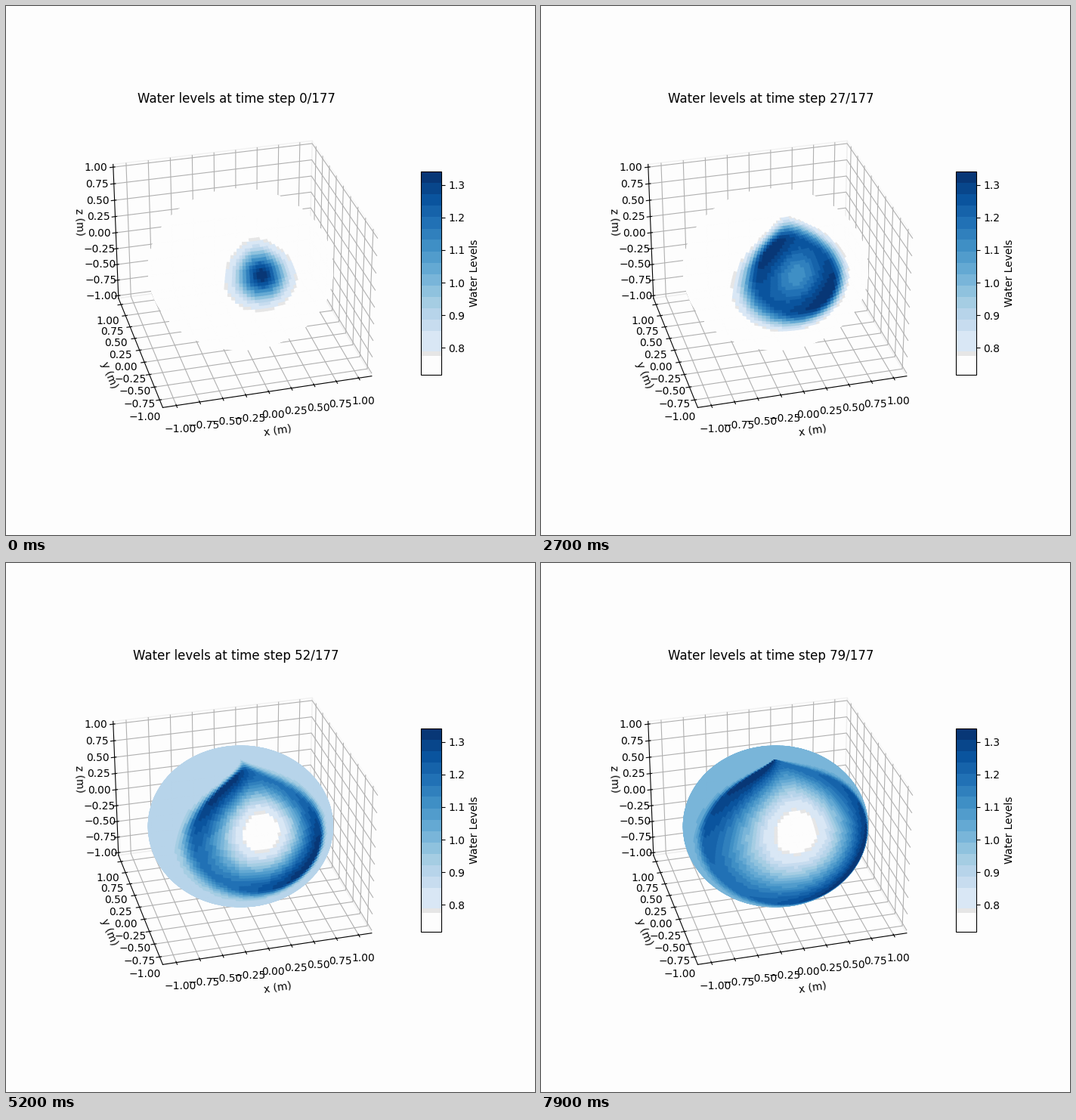
Write a matplotlib script that moves like this. It is 700x700 px and loops after 8 s.

```python
import numpy as np
import matplotlib.pyplot as plt
from matplotlib.animation import FuncAnimation
from matplotlib.cm import ScalarMappable
from matplotlib.collections import PolyCollection
from matplotlib.colors import ListedColormap, Normalize, to_rgba
from mpl_toolkits.mplot3d import proj3d

STEPS, INTERVAL, TOTAL = 80, 100, 177
PAPER = "#fdfdfd"
N_LON, N_LAT = 150, 75
HILL_LON, HILL_LAT = -90, 30


def banded_blues():
    """Blues in 14 flat bands above a pale foot."""
    blues = plt.get_cmap("Blues")
    levels = (np.arange(512) + 0.5) / 512
    start = 0.215
    step = (1 - start) / 14
    colors = []
    for v in levels:
        if v < 0.093:
            colors.append(to_rgba(PAPER))
        elif v < 0.115:
            colors.append(to_rgba("#e6e6e6"))
        elif v < start:
            colors.append(to_rgba("#d9e7f5"))
        else:
            colors.append(blues(start + (np.floor((v - start) / step) + 0.5) * step))
    return ListedColormap(colors)


cmap = banded_blues()

fig = plt.figure(figsize=(7, 7), dpi=100, facecolor=PAPER)
ax = fig.add_subplot(projection="3d", facecolor=PAPER)
ax.view_init(elev=30, azim=-105)
side, height = 1.1 * 25 / 24, 25 / 24
ax.set(xlim=(-side, side), ylim=(-side, side), zlim=(-height, height),
       xlabel="x (m)", ylabel="y (m)", zlabel="z (m)")
for axis in (ax.xaxis, ax.yaxis, ax.zaxis):
    axis.pane.fill = False

bar = fig.colorbar(ScalarMappable(Normalize(0.7163, 1.342), cmap), ax=ax,
                   shrink=0.5, aspect=10, label="Water Levels")
bar.ax.set_facecolor(PAPER)
title = ax.set_title("")

# Project the sphere once and keep the cells that face the viewer.
lon = np.linspace(-180, 180, N_LON + 1)
lat = np.linspace(-90, 90, N_LAT + 1)
LON, LAT = np.meshgrid(np.radians(lon), np.radians(lat))
px, py, _ = proj3d.proj_transform((np.cos(LAT) * np.cos(LON)).ravel(),
                                  (np.cos(LAT) * np.sin(LON)).ravel(),
                                  np.sin(LAT).ravel(), ax.get_proj())
P = np.stack([px, py], axis=-1).reshape(N_LAT + 1, N_LON + 1, 2)
quads = np.stack([P[:-1, :-1], P[:-1, 1:], P[1:, 1:], P[1:, :-1]], axis=2).reshape(-1, 4, 2)
d1, d2 = quads[:, 2] - quads[:, 0], quads[:, 3] - quads[:, 1]
front = d1[:, 0] * d2[:, 1] - d1[:, 1] * d2[:, 0] > 0

mid_lon, mid_lat = np.meshgrid((lon[:-1] + lon[1:]) / 2, (lat[:-1] + lat[1:]) / 2)
d_lon = ((mid_lon - HILL_LON + 180) % 360 - 180).ravel()[front]
d_lat = (mid_lat - HILL_LAT).ravel()[front]
rho = np.hypot(d_lon, d_lat)
skew = np.sin(2 * np.arctan2(d_lat, d_lon))

sphere = PolyCollection(quads[front], transform=ax.transData, linewidths=1, zorder=5)
fig.add_artist(sphere)

# Wave shape over time; distances in degrees from the hill.
KEYS = [0, 16, 27, 41, 52, 63, 79]
SHAPE = dict(
    crest=[0, 7.9, 26, 38.5, 46.5, 56, 67],
    width=[16.8, 16.9, 11.5, 10, 7.4, 7, 5.6],
    center=[1, 1, 0.62, 0.02, 0, 0, 0],
    peak=[1, 1, 0.92, 0.87, 0.86, 0.87, 0.88],
    lean=[0, 0, 0.08, 0.13, 0.13, 0.12, 0.12],
    power=[2, 2, 2, 2.5, 2.5, 2.35, 2],
    pinch=[0, 0.1, 0.25, 0.4, 0.45, 0.45, 0.45],
)


def water(step):
    s = {name: np.interp(step, KEYS, vals) for name, vals in SHAPE.items()}
    rest = 0.5 * (1 - np.exp(-max(step - 41, 0) / 12))
    peak = s["peak"] - s["lean"] * skew
    crest = s["crest"] * (1 - 0.03 * skew) + 1e-6
    width = s["width"] * (1 + s["pinch"] * skew)
    rise = np.sin(np.pi / 2 * np.clip(rho / crest, 0, 1)) ** s["power"]
    inner = s["center"] + (peak - s["center"]) * rise
    outer = rest + (peak - rest) * np.exp(-((rho - crest) / width) ** 2)
    return np.clip(np.where(rho < crest, inner, outer), 0, 1)


def update(step):
    title.set_text(f"Water levels at time step {step}/{TOTAL}")
    colors = cmap(water(step))
    sphere.set_facecolor(colors)
    sphere.set_edgecolor(colors)
    return sphere, title


anim = FuncAnimation(fig, update, frames=STEPS, interval=INTERVAL,
                     repeat=True, repeat_delay=0, cache_frame_data=False)
plt.show()
```
